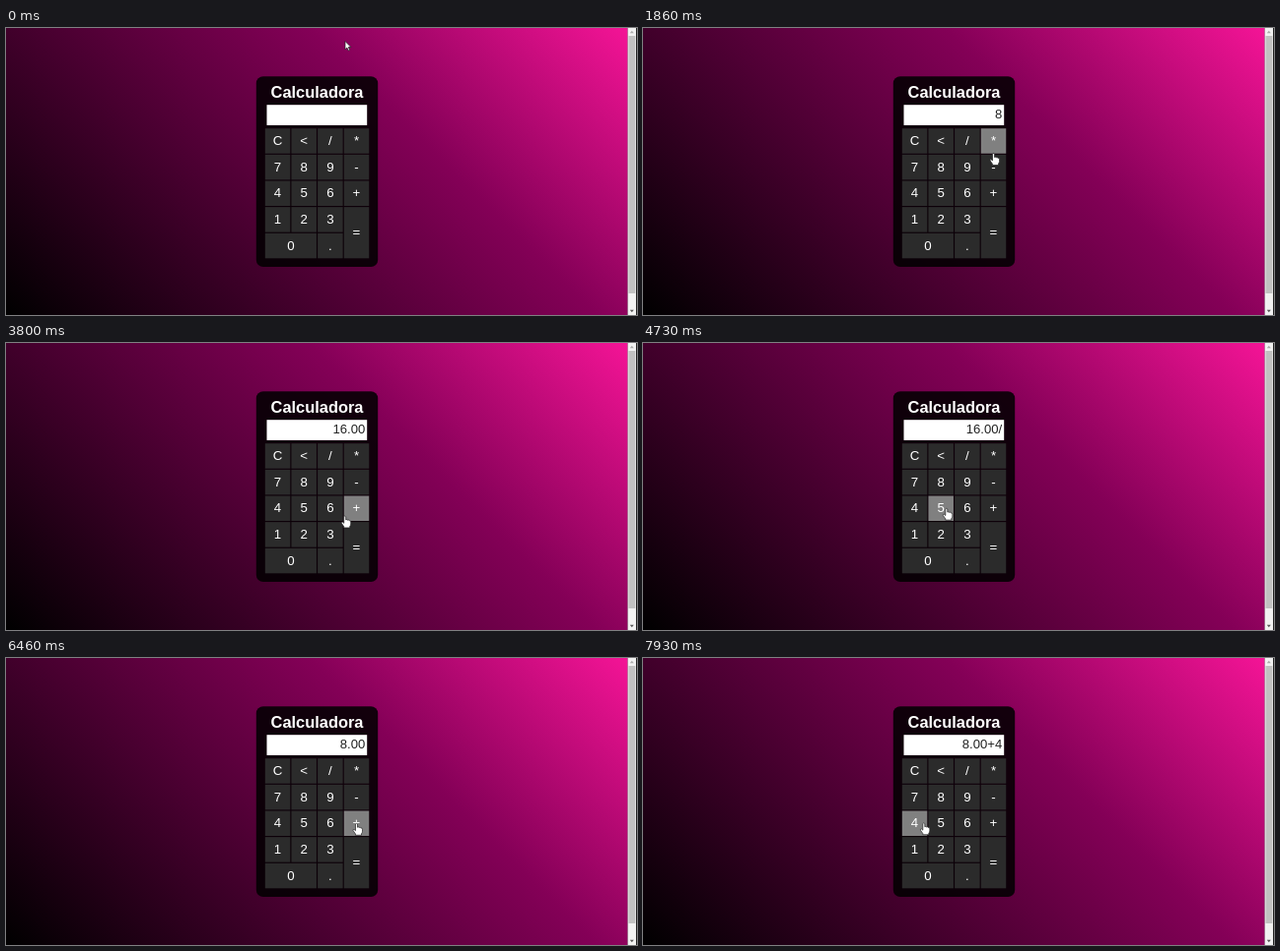
Recreate the animation shown at these times as an HTML page with a canvas. Size 640 by 292 pixels, loop 8000 ms.

```html
<!DOCTYPE html>
<html lang="es">
<head>
<meta charset="utf-8">
<title>Calculadora</title>
<style>
html, body { margin: 0; width: 100%; height: 100%; overflow: hidden; background: #000; }
canvas { display: block; width: 640px; height: 292px; }
</style>
</head>
<body>
<canvas id="stage" width="640" height="292"></canvas>
<script>
const ctx = document.getElementById('stage').getContext('2d');
const LOOP = 8000, FPS = 15;
const PAGE_W = 630.6, PAGE_H = 292;
const FONT = '"Liberation Sans", Arial, sans-serif';

// Keypad grid: label, column, row, column span, row span
const LEFT = 262.8, TOP = 102.2, PITCH = 26.65, SIZE = 25.5;
const keys = {};
function addKey(label, col, row, cols = 1, rows = 1) {
  const x = LEFT + col * PITCH, y = TOP + row * PITCH;
  const w = SIZE + (cols - 1) * PITCH, h = SIZE + (rows - 1) * PITCH;
  keys[label] = { label, x, y, w, h, cx: x + w / 2, cy: y + h / 2 };
}
['C</*', '789-', '456+', '123'].forEach((line, row) =>
  [...line].forEach((label, col) => addKey(label, col, row)));
addKey('0', 0, 4, 2);
addKey('.', 2, 4);
addKey('=', 3, 3, 1, 2);

// The pointer leaves for a key, reaches it and may press it
const HOME = { cx: 344, cy: 14 };
const visits = [
  { key: '8', leave: 60, arrive: 860, press: 1200 },
  { key: '-', leave: 1260, arrive: 1730 },
  { key: '*', leave: 1730, arrive: 2000, press: 2060 },
  { key: '2', leave: 2130, arrive: 2460, press: 2530 },
  { key: '=', leave: 2600, arrive: 2930, press: 3200 },
  { key: '/', leave: 3600, arrive: 4110, press: 4200 },
  { key: '2', leave: 4530, arrive: 4860, press: 5060 },
  { key: '=', leave: 5130, arrive: 5400, press: 5530 },
  { key: '+', leave: 6000, arrive: 6500, press: 6800 },
  { key: '4', leave: 7050, arrive: 8310, press: 7860 }
];

const operate = {
  '+': (a, b) => a + b,
  '-': (a, b) => a - b,
  '*': (a, b) => a * b,
  '/': (a, b) => a / b
};

function press(shown, label) {
  if (label !== '=') return shown + label;
  const [, a, op, b] = shown.match(/^([\d.]+)([-+*/])([\d.]+)$/);
  return operate[op](+a, +b).toFixed(2);
}

const readingAt = t => visits
  .filter(v => v.press <= t)
  .reduce((shown, v) => press(shown, v.key), '');

const smooth = u => u * u * (3 - 2 * u);
const mix = (a, b, u) => a + (b - a) * u;

function pointerAt(t) {
  const i = visits.findLastIndex(v => v.leave <= t);
  if (i < 0) return { x: HOME.cx, y: HOME.cy };
  const { key, leave, arrive } = visits[i];
  const from = i ? keys[visits[i - 1].key] : HOME, to = keys[key];
  const e = smooth(Math.min(1, (t - leave) / (arrive - leave)));
  const lead = 1 - (1 - e) ** 1.4; // sideways motion runs ahead
  return { x: mix(from.cx, to.cx, lead), y: mix(from.cy, to.cy, e) };
}

const keyUnder = p => Object.values(keys).find(k =>
  Math.abs(p.x - k.cx) <= PITCH * k.w / SIZE / 2 &&
  Math.abs(p.y - k.cy) <= PITCH * k.h / SIZE / 2);

function rect(x, y, w, h, color) {
  ctx.fillStyle = color;
  ctx.fillRect(x, y, w, h);
}

function text(str, x, y, font, color, align = 'center') {
  ctx.font = font + ' ' + FONT;
  ctx.fillStyle = color;
  ctx.textAlign = align;
  ctx.fillText(str, x, y);
}

function triangle(x, y, dir, color) {
  ctx.fillStyle = color;
  ctx.beginPath();
  ctx.moveTo(x - 2, y - dir);
  ctx.lineTo(x + 2, y - dir);
  ctx.lineTo(x, y + dir);
  ctx.fill();
}

function drawPage() {
  const d = (PAGE_W + PAGE_H) / 4, cx = PAGE_W / 2, cy = PAGE_H / 2;
  const g = ctx.createLinearGradient(cx - d, cy + d, cx + d, cy - d);
  g.addColorStop(0, '#000');
  g.addColorStop(0.65, 'rgb(132,0,87)');
  g.addColorStop(1, 'rgb(244,20,150)');
  rect(0, 0, 640, PAGE_H, '#222');
  rect(0, 0, PAGE_W, PAGE_H, g);

  rect(PAGE_W, 0, 639 - PAGE_W, PAGE_H, '#f1f1f1');
  rect(PAGE_W + 0.9, 8, 6.8, 262, '#c1c1c1');
  triangle(634.8, 4, -1.2, '#aaa');
  triangle(634.8, 288, 1.2, '#555');
}

function drawCalculator(reading, hovered) {
  ctx.fillStyle = 'rgba(0,0,0,0.86)';
  ctx.beginPath();
  ctx.roundRect(253.8, 49.3, 123.4, 193.7, 7);
  ctx.fill();

  text('Calculadora', 315.5, 71.2, 'bold 16.4px', '#fff');
  rect(264.5, 78.2, 101.7, 20.7, '#fff');
  text(reading, 364.2, 92.2, '13.1px', '#222', 'right');

  for (const k of Object.values(keys)) {
    rect(k.x, k.y, k.w, k.h, k === hovered ? '#808080' : '#2b2b2b');
    text(k.label, k.cx, k.cy + 4.2, '13.3px', '#fff');
  }
}

const arrow = new Path2D('M0 0V8.2L1.9 6.5L3.2 9.5L4.6 8.9L3.3 6H5.9Z');
const hand = new Path2D('M-1 .8Q0-.6 1 .8V4Q2 3.3 2.8 4.2Q3.8 3.7 4.4 4.7Q6 4.4 6 6' +
  'V8Q6 9.5 5 10.5V12H-1V10.8L-3.4 7.4Q-3.8 6 -2.5 6.1L-1 7.4Z');

function drawPointer(p, shape) {
  ctx.save();
  ctx.translate(p.x, p.y - 0.5);
  ctx.lineJoin = 'round';
  ctx.lineWidth = 0.7;
  ctx.strokeStyle = '#222';
  ctx.fillStyle = '#fff';
  ctx.fill(shape);
  ctx.stroke(shape);
  ctx.restore();
}

function draw(now) {
  const step = 1000 / FPS;
  const t = Math.floor((now % LOOP + 7) / step) * step;
  const pointer = pointerAt(t), hovered = keyUnder(pointer);
  drawPage();
  drawCalculator(readingAt(t), hovered);
  drawPointer(pointer, hovered ? hand : arrow);
}

const start = performance.now();
function tick() {
  draw(performance.now() - start);
  requestAnimationFrame(tick);
}
tick();
</script>
</body>
</html>
```
